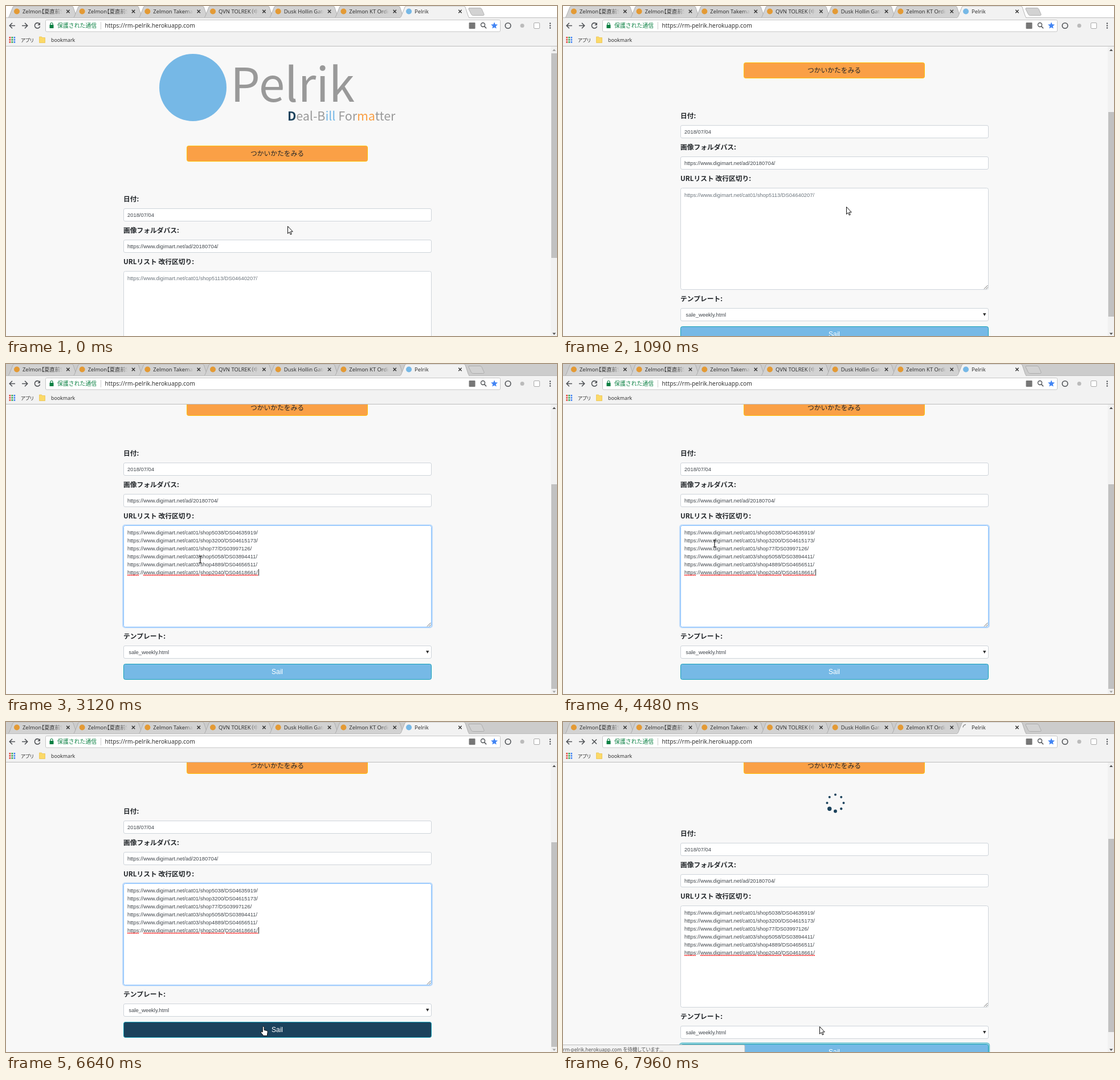
Write an HTML page that moves like this. It is 967 px wide and 579 px high and loops after 8000 ms.

```html
<!DOCTYPE html>
<html lang="ja">
<head>
<meta charset="utf-8">
<title>Pelrik</title>
<style>
html, body { margin: 0; width: 100%; height: 100%; overflow: hidden; background: #f8f8f8; }
svg { display: block; width: 100%; height: 100%; }
text { white-space: pre; }
.ui { font-family: "Noto Sans", "Noto Sans CJK JP", sans-serif; font-feature-settings: "palt"; }
.jp { font: 11.75px "Noto Sans CJK JP", sans-serif; fill: #212529; }
.label { font-weight: 700; }
.field { font: 9.38px "Liberation Sans", Arial, sans-serif; fill: #40464c; }
.box { fill: #fff; stroke: #ced4da; }
.line { fill: none; stroke: #505357; stroke-width: 1.6; }
</style>
</head>
<body>
<svg viewBox="0 0 967 579">
  <defs>
    <clipPath id="view"><rect y="71" width="956" height="508"/></clipPath>
    <linearGradient id="fade" gradientUnits="userSpaceOnUse" x1="82" x2="96" y1="0" y2="0">
      <stop stop-color="#333"/><stop offset="1" stop-color="#333" stop-opacity="0"/>
    </linearGradient>
  </defs>
  <rect width="967" height="579" fill="#f8f8f8"/>

  <g clip-path="url(#view)"><g id="doc">
    <circle cx="328" cy="143" r="59" fill="#76b8e6"/>
    <g font-family="Noto Sans CJK JP, Noto Sans, sans-serif" fill="#999">
      <text x="394" y="168" font-size="82">Pelrik</text>
      <text x="494" y="201" font-size="21.4"><tspan fill="#1b425c" font-weight="700">D</tspan>eal-B<tspan fill="#76b8e6" font-weight="500">ill</tspan> For<tspan fill="#faa046" font-weight="500">ma</tspan>tter</text>
    </g>
    <rect x="317.5" y="245.5" width="317" height="27" rx="3" fill="#faa046" stroke="#ffc107"/>
    <text class="jp" x="476" y="263" text-anchor="middle">つかいかたをみる</text>
    <g id="loader" fill="#1b425c"></g>
    <g id="form">
      <g id="fields"></g>
      <rect id="areaRing" x="205" y="464.5" width="543" height="180" rx="4" fill="none" stroke="#3c98ff" stroke-width="2"/>
      <rect id="area" class="box" x="206.5" y="465.5" width="540" height="178" rx="3"/>
      <path d="M739 642.5l6.5-6.5M742.5 642.5l3-3" stroke="#555" stroke-width=".9"/>
      <text id="hint" class="field" x="213" y="480.5" style="fill:#6c757d">https://www.digimart.net/cat01/shop5113/DS04640207/</text>
      <g id="urls"></g>
      <rect id="caret" width="1" height="11.5" fill="#222"/>
      <rect id="sailRing" x="205" y="706.5" width="543" height="30" rx="4" fill="none" stroke="#17a2b8" stroke-opacity=".55" stroke-width="2.5"/>
      <rect id="sail" x="206.5" y="708.5" width="540" height="27" rx="3" stroke="#17a2b8"/>
      <text x="476" y="726" text-anchor="middle" fill="#fff" style="font:12px 'Liberation Sans',Arial,sans-serif">Sail</text>
    </g>
  </g></g>

  <rect x="956" y="71" width="11" height="508" fill="#f1f1f1"/>
  <rect id="thumb" x="957" width="10" fill="#c1c1c1"/>
  <path id="upArrow" d="M959 79h6l-3-3.5z"/>
  <path id="downArrow" d="M959 573.5h6l-3 3.5z"/>

  <g class="ui">
    <rect id="strip" width="967" height="20"/>
    <g id="tabs"></g>
    <path d="M813 3.5h19q2 0 3 2l4 9q.5 2-1.5 2h-18q-2 0-3-2l-4.500-9q-.5-2 1-2z" fill="#d2d2d2" stroke="#a5a5a5" stroke-width=".8"/>
    <rect y="20" width="967" height="50" fill="#f2f2f2"/>
    <path d="M0 20.5H692M812 20.5H967" stroke="#b0b0b0" stroke-width=".8"/>
    <path d="M0 70.5H967" stroke="#bdbdbd"/>
    <path class="line" d="M16 34.5H6.5M11 29.8L6.3 34.5 11 39.2M28 34.5h9.5M33 29.8l4.7 4.7-4.7 4.7"/>
    <g id="reload"><path class="line" d="M58.6 31.2a4.7 4.7 0 1 0 1 4.5"/><path d="M60 29v4.8h-4.8z" fill="#505357"/></g>
    <path id="stop" class="line" d="M51 30.5l8 8M59 30.5l-8 8"/>
    <rect x="69.5" y="24.5" width="798" height="20.5" rx="2" fill="#fff" stroke="#c6c6c6"/>
    <rect x="76.5" y="33" width="7" height="6" rx=".6" fill="#0b8043"/>
    <path d="M78 33v-1.5a2 2 0 0 1 4 0V33" fill="none" stroke="#0b8043" stroke-width="1.2"/>
    <text x="90" y="38" font-size="9.9" fill="#0b8043" style="font-feature-settings:normal">保護された通信</text>
    <path d="M166.5 28v13" stroke="#ccc"/>
    <text x="173.5" y="38" font-size="10.25" fill="#333">https://rm-pelrik.herokuapp.com</text>
    <rect x="812.5" y="29" width="11" height="11" rx="1" fill="#777"/>
    <circle class="line" cx="837" cy="33" r="3.5" style="stroke-width:1.4"/><path class="line" d="M839.5 35.5l3.5 3.8"/>
    <path d="M857 28.2l1.7 4 4.3.4-3.3 2.8 1 4.2-3.7-2.2-3.7 2.2 1-4.2-3.3-2.8 4.3-.4z" fill="#4285f4"/>
    <circle class="line" cx="881" cy="34.5" r="4.8"/>
    <circle cx="906" cy="34.5" r="3.5" fill="#bbb"/>
    <rect x="926.5" y="29.5" width="10" height="10" rx="1.5" fill="#fff" stroke="#aaa"/>
    <g fill="#505357"><circle cx="955" cy="30.5" r="1.2"/><circle cx="955" cy="34.5" r="1.2"/><circle cx="955" cy="38.5" r="1.2"/></g>
    <g id="apps"></g>
    <text x="26" y="62.5" font-size="8.5" fill="#333">アプリ</text>
    <path d="M58.5 54h4l1 1.5h5v9h-10z" fill="#fbd968" stroke="#e8bd45" stroke-width=".7"/>
    <text x="79" y="62.5" font-size="8.8" fill="#333">bookmark</text>
    <g id="status">
      <path d="M-1 566.5H317q2 0 2 2V580H-1z" fill="#f3f3f3" stroke="#bbb"/>
      <text x="0" y="577.5" font-size="8.6" fill="#555">rm-pelrik.herokuapp.com を待機しています...</text>
    </g>
  </g>

  <g id="cursor" stroke-linejoin="round">
    <path id="arrow" d="M.5 .5V13.3L3.4 10.6 5.3 15 7.2 14.2 5.4 9.9H9.3z" fill="#fff" stroke="#111"/>
    <path id="beam" d="M-2.8-6h2l.8.8.8-.8h2M0-5.5V5.5M-2.8 6h2l.8-.8.8.8h2" fill="none" stroke="#222" stroke-width="1.2"/>
    <path id="hand" d="M.3 10V1.7a1.4 1.4 0 0 1 2.8 0V6.5l4.8 1.1q1.5.5 1.3 2.2L8.3 16.5H2L-2.6 11q-.6-1.7.8-1.8z" fill="#fff" stroke="#111"/>
  </g>
</svg>
<script>
const LOOP = 8000, FOCUS = 1880, PASTE = 3120, PRESS = 7250, LOAD = 7330;
const $ = id => document.getElementById(id);
const clamp = v => Math.max(0, Math.min(1, v));
const show = (id, on) => { $(id).style.display = on ? '' : 'none'; };

// Static parts
const titles = ['Zelmon【夏直前SALE', 'Zelmon【夏直前SALE', 'Zelmon Takemaru', 'QVN TOLREK（中古', 'Dusk Hollin Gate', 'Zelmon KT Ordinar', 'Pelrik'];
$('tabs').innerHTML = titles.map((title, i) => {
  const active = i === 6, fill = active ? '#f2f2f2' : '#d2d2d2';
  const icon = active
    ? `<circle id="icon" cx="16" cy="9.5" r="5" fill="#76b8e6"/>
       <path id="busy" d="M11 9.5a5 5 0 0 1 5-5" fill="none" stroke="#888" stroke-width="1.3"/>`
    : '<circle cx="16" cy="9.5" r="5" fill="#e39a35"/>';
  return `<g transform="translate(${3 + 114.67 * i})">
    <path d="M0 21Q2 20 3 17L9 2Q10 0 12 0H112Q114 0 115 2L120 17Q121 20 123 21z" fill="${fill}" stroke="#a5a5a5" stroke-width=".8"/>
    ${icon}
    <text x="26" y="13" font-size="9.4" fill="${active ? '#333' : 'url(#fade)'}">${title}</text>
    <path d="M103.2 6.8l5.4 5.4M108.6 6.8l-5.4 5.4" stroke="#333" stroke-width="1.4"/></g>`;
}).join('');

const dotColors = ['#e8453c', '#35a853', '#4285f4', '#f9bb2d'];
$('apps').innerHTML = [...Array(9).keys()].map(i => {
  const col = i % 3, row = Math.floor(i / 3);
  return `<rect x="${5.5 + col * 4}" y="${54 + row * 4}" width="2.7" height="2.7" fill="${dotColors[(i + row) % 4]}"/>`;
}).join('');

const label = (y, s) => `<text class="jp label" x="206" y="${y}">${s}</text>`;
const input = (y, s, x = 213) => `<rect class="box" x="206.5" y="${y}" width="540" height="22" rx="2.5"/>
  <text class="field" x="${x}" y="${y + 14.3}">${s}</text>`;
$('fields').innerHTML = label(342.5, '日付:') + input(355.5, '2018/07/04')
  + label(398, '画像フォルダパス:') + input(410.5, 'https://www.digimart.net/ad/20180704/')
  + label(453, 'URLリスト 改行区切り:') + label(664, 'テンプレート:')
  + input(676.5, 'sale_weekly.html', 215.5) + '<path d="M737 685h5.5l-2.75 5z" fill="#333"/>';

const items = ['01/shop5038/DS04635919', '01/shop3200/DS04615173', '01/shop77/DS03997126',
  '03/shop5058/DS03894411', '03/shop4889/DS04656511', '01/shop2040/DS04618661'];
$('urls').innerHTML = items.map((s, i) =>
  `<text class="field" x="213" y="${480.5 + 14.1 * i}">https://www.digimart.net/cat${s}/</text>`).join('')
  + '<path d="M213 552.5H233M241 552.5H339.5M342 552.5H384M386 552.5H442" stroke="#f22" stroke-width="1.3" stroke-dasharray="2.5 .5"/>';

$('loader').innerHTML = '<circle/>'.repeat(8);
const dots = [...$('loader').children];
dots.forEach((dot, i) => {
  dot.setAttribute('cx', 478 + 14.5 * Math.sin(i * Math.PI / 4));
  dot.setAttribute('cy', 324 - 14.5 * Math.cos(i * Math.PI / 4));
});

// Mouse moves: start, end, number of steps, waypoints
const moves = [
  [0, 1, 1, [494, 386], [494, 386]],
  [260, 420, 3, [494, 386], [500, 386]],
  [560, 850, 5, [500, 386], [497, 352]],
  [1410, 1880, 7, [497, 352], [341, 343]],
  [4370, 4770, 6, [341, 343], [312, 367], [262, 310], [228, 233]],
  [5240, 5380, 3, [228, 233], [391, 246]],
  [5930, 6640, 10, [391, 246], [450, 534]]
];
function mouse(t) {
  const [start, end, steps, ...pts] = moves.findLast(m => t >= m[0]);
  const step = Math.floor((t - start) / (end - start) * (steps - 1) + .001) + 1;
  const eased = 1 - (1 - clamp(step / steps)) ** 2.5;
  const p = eased * (pts.length - 1);
  const i = Math.min(Math.floor(p), pts.length - 2);
  return [0, 1].map(k => Math.round(pts[i][k] + (pts[i + 1][k] - pts[i][k]) * (p - i)));
}

const blinks = [FOCUS, 2350, 2890, 3670, 4220, 4770, 5310, 5780, 6330, 6870];
const scrollAt = t => t < 1020 ? 0 : t < 1090 ? 75 : t < 1180 ? 146 : 182;
const mix = (a, b, p) => `rgb(${a.map((v, i) => Math.round(v + (b[i] - v) * p))})`;

function render(t) {
  const scroll = scrollAt(t), loading = t >= LOAD, shift = loading ? 39 : 0;
  $('doc').setAttribute('transform', `translate(0 ${-scroll})`);
  $('form').setAttribute('transform', `translate(0 ${shift})`);
  const total = 690 + shift;
  $('thumb').setAttribute('y', Math.round(83 + 487 * scroll / total));
  $('thumb').setAttribute('height', Math.round(487 * 508 / total));
  $('upArrow').setAttribute('fill', scroll ? '#505050' : '#a3a3a3');
  $('downArrow').setAttribute('fill', scroll + 508 < total ? '#505050' : '#a3a3a3');

  // The first click also activates the window, which darkens the tab strip
  $('strip').setAttribute('fill', t >= FOCUS ? '#ccc' : '#fff');
  const focused = t >= FOCUS && t < PRESS, pasted = t >= PASTE;
  $('area').style.stroke = focused ? '#80bdff' : '';
  $('areaRing').style.opacity = focused ? (t < 2010 ? .08 : .3) : 0;
  show('hint', !pasted);
  show('urls', pasted);
  show('caret', focused && blinks.filter(b => t >= b).length % 2);
  $('caret').setAttribute('x', pasted ? 443 : 213);
  $('caret').setAttribute('y', pasted ? 542 : 472);

  const [x, y] = mouse(t);
  const overText = t >= 1410 && ((y >= 229 && y <= 251) || (y >= 284 && y <= 462));
  const overButton = y >= 526 && t < LOAD + 80;
  $('cursor').setAttribute('transform', `translate(${x} ${y})`);
  show('beam', overText);
  show('hand', overButton);
  show('arrow', !overText && !overButton);

  const hover = clamp((t - 6480) / 150) - clamp((t - LOAD - 80) / 150);
  $('sail').setAttribute('fill', mix([118, 185, 230], [27, 66, 92], hover));
  show('sailRing', t >= PRESS);

  show('loader', loading);
  const head = 5 + (t - 7960) / 125;
  dots.forEach((dot, i) => {
    const lag = ((head - i) % 8 + 8) % 8;
    const size = lag > 7 ? lag - 7 : clamp(1 - lag / 2.2);
    dot.setAttribute('r', 2 + 1.7 * size);
  });
  show('icon', !loading);
  show('busy', loading);
  $('busy').setAttribute('transform', `rotate(${(7960 - t) * .3} 16 9.5)`);
  show('reload', !loading);
  show('stop', loading);
  show('status', t >= 7490);
}

const begin = performance.now();
function tick() {
  render((performance.now() - begin) % LOOP);
  requestAnimationFrame(tick);
}
tick();
</script>
</body>
</html>
```
